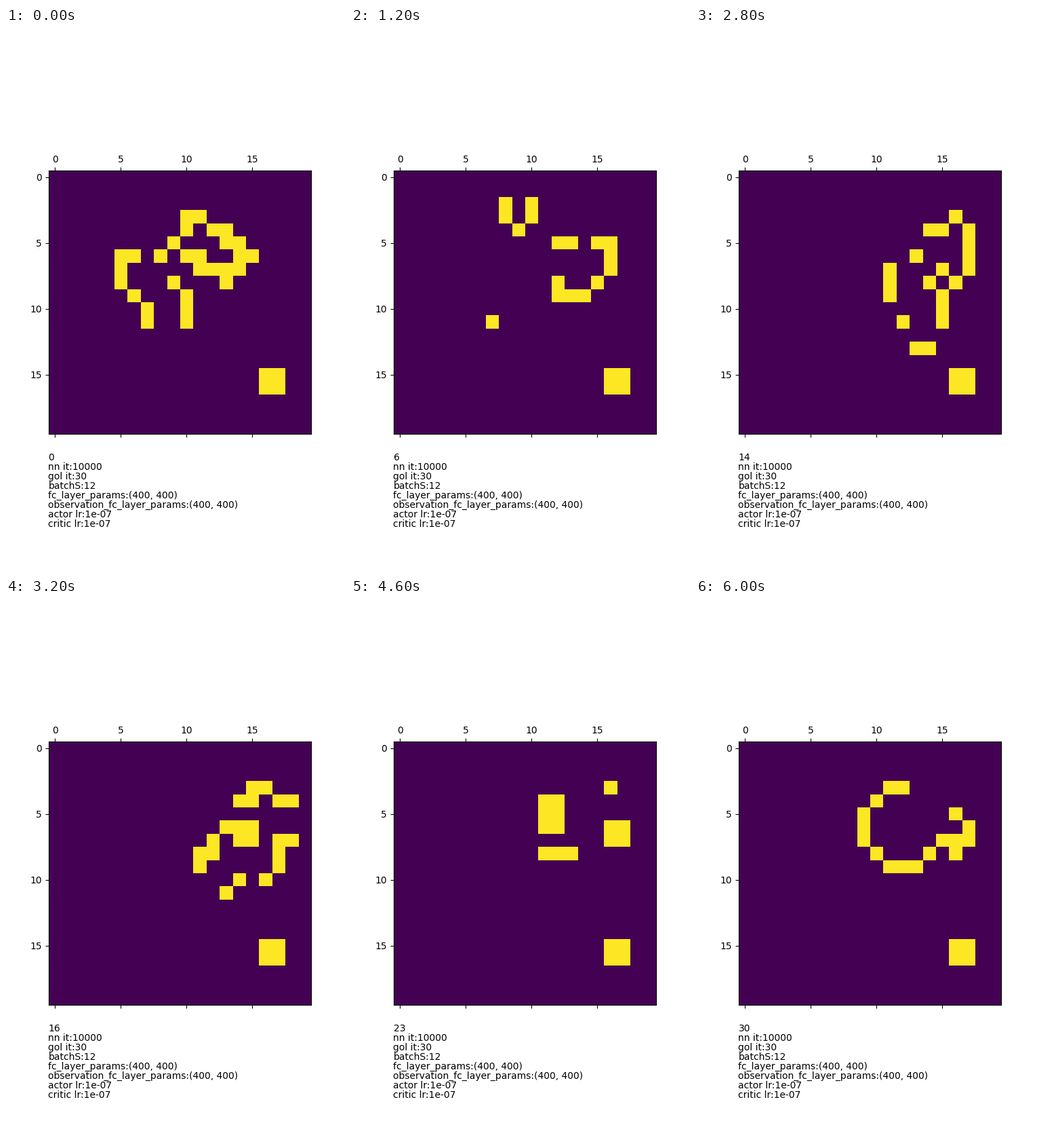
Animation of 500 by 800 pixels, one loop 8000 ms. Source, as a matplotlib script:

```python
import numpy as np
import matplotlib.pyplot as plt
from matplotlib.animation import FuncAnimation

SIZE = 20
STEPS = 30
HOLD = 10
INTERVAL = 200

SEED = """
.....##....
.....#.##..
....#...##.
##.#.##..##
#.....####.
#...#...#..
.#...#.....
..#..#.....
..#..#.....
""".split()

INFO = [
    "nn it:10000",
    "gol it:30",
    "batchS:12",
    "fc_layer_params:(400, 400)",
    "observation_fc_layer_params:(400, 400)",
    "actor lr:1e-07",
    "critic lr:1e-07",
]


def start_board():
    board = np.zeros((SIZE, SIZE), dtype=int)
    pattern = np.array([[c == "#" for c in row] for row in SEED])
    height, width = pattern.shape
    board[3:3 + height, 5:5 + width] = pattern
    board[15:17, 16:18] = 1
    return board


def next_board(board):
    padded = np.pad(board, 1)
    # Each 3x3 total includes the cell itself.
    total = sum(padded[r:r + SIZE, c:c + SIZE]
                for r in range(3) for c in range(3))
    alive = (total == 3) | ((total == 4) & (board == 1))
    # Only cells inside the border are ever updated.
    result = np.zeros_like(board)
    inner = slice(2, SIZE - 1)
    result[inner, inner] = alive[inner, inner]
    return result


boards = [start_board()]
for _ in range(STEPS):
    boards.append(next_board(boards[-1]))

fig, ax = plt.subplots(figsize=(5, 8), dpi=100)
image = ax.matshow(boards[0], vmin=0, vmax=1)


def text_line(row, text):
    return fig.text(62.5 / 500, (163 - 14 * row) / 800, text,
                    fontsize=10, family="DejaVu Sans", va="baseline")


counter = text_line(0, "0")
for row, text in enumerate(INFO, start=1):
    text_line(row, text)


def update(frame):
    step = min(frame, STEPS)
    image.set_data(boards[step])
    counter.set_text(str(step))
    return image, counter


anim = FuncAnimation(fig, update, frames=STEPS + HOLD, interval=INTERVAL,
                     repeat=True, repeat_delay=0)
plt.show()
```
